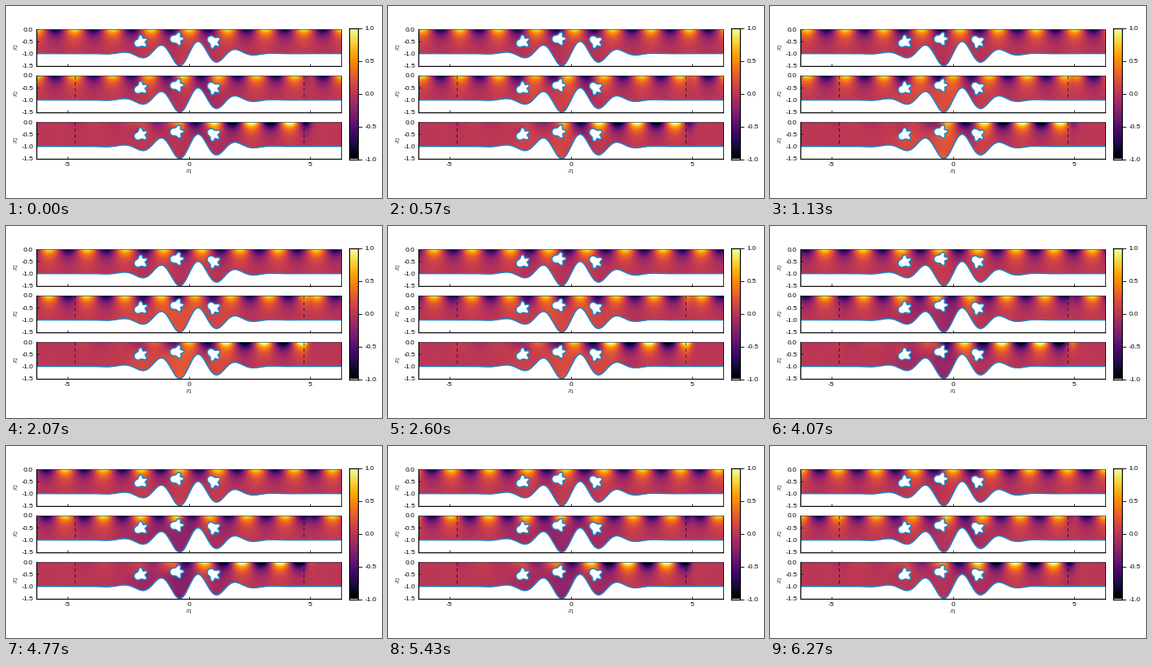
Recreate the animation shown at these times as a matplotlib script. Size 470 by 240 pixels, loop 6310 ms.

```python
import numpy as np
import matplotlib.pyplot as plt
from matplotlib.animation import FuncAnimation

W, H, DPI = 470, 240, 100
PX = 72 / DPI
FRAMES, LOOP = 189, 6310
K, NX, NY = 4, 760, 90
XMAX, PML = 2 * np.pi, 1.5 * np.pi
BLUE = "#2383bf"
BODIES = [(-1.98, -0.52, 207), (-0.49, -0.40, 183), (1.02, -0.51, 142)]

plt.rcParams.update({
    "font.family": "Liberation Sans",
    "font.size": 8.5 * PX,
    "axes.linewidth": 1.2 * PX,
    "axes.unicode_minus": False,
    "mathtext.fontset": "cm",
})


def bottom(x):
    return -1 + 0.52 * np.exp(-0.3 * x**2) * np.sin(4 * x)


def radius(a, turn):
    """One broad lobe pointing along `turn`, three slim ones opposite."""
    p = a - np.radians(turn)
    return 0.235 * (1 + 0.24 * np.cos(4 * p - 1.9 * np.sin(p)))


def body_outline(cx, cy, turn):
    a = np.linspace(0, 2 * np.pi, 161)
    r = radius(a, turn)
    return cx + r * np.cos(a), cy + r * np.sin(a)


def solve_waves():
    """Incident wave and the field scattered by bodies and sea bed."""
    dx, dy = 2 * XMAX / NX, 1.5 / NY
    x = -XMAX + (np.arange(NX) + 0.5) * dx
    y = -(np.arange(NY) + 0.5) * dy
    X, Y = np.meshgrid(x, y)

    fluid = Y > bottom(X)
    for cx, cy, turn in BODIES:
        u, v = X - cx, Y - cy
        fluid &= np.hypot(u, v) > radius(np.arctan2(v, u), turn)

    def stretch(p):
        return 1 + 10j * np.maximum(np.abs(p) - PML, 0) / (XMAX - PML)

    nu = K * np.tanh(K)
    top = nu / (dy * (1 - nu * dy / 2))

    def coefficients(s, s_face):
        cx = (fluid[:, :-1] & fluid[:, 1:]) / (s_face * dx**2)
        cy = (fluid[:-1] & fluid[1:]) * s / dy**2
        diag = np.zeros((NY, NX), complex)
        diag[:, :-1] -= cx
        diag[:, 1:] -= cx
        diag[:-1] -= cy
        diag[1:] -= cy
        diag[0] += top * s
        return cx, cy, diag

    inc = np.cosh(K * (Y + 1)) / np.cosh(K) * np.exp(1j * K * X)

    # the residual of the incident wave drives the scattered one
    cx, cy, diag = coefficients(np.ones(NX), np.ones(NX - 1))
    res = diag * inc
    res[:, :-1] += cx * inc[:, 1:]
    res[:, 1:] += cx * inc[:, :-1]
    res[:-1] += cy * inc[1:]
    res[1:] += cy * inc[:-1]
    rhs = np.where(fluid & (np.abs(X) < PML - dx), -res, 0)

    cx, cy, diag = coefficients(stretch(x), stretch(x[:-1] + dx / 2))
    diag = np.where(fluid, diag - 1e-6, 1)

    # block tridiagonal elimination, column by column
    inverses = []
    for j in range(NX):
        block = np.diag(diag[:, j]) + np.diag(cy[:, j], 1) + np.diag(cy[:, j], -1)
        if j:
            c = cx[:, j - 1]
            block -= c[:, None] * inverses[-1] * c
            rhs[:, j] -= c * (inverses[-1] @ rhs[:, j - 1])
        inverses.append(np.linalg.inv(block))
    sca = np.zeros((NY, NX), complex)
    sca[:, -1] = inverses[-1] @ rhs[:, -1]
    for j in range(NX - 2, -1, -1):
        sca[:, j] = inverses[j] @ (rhs[:, j] - cx[:, j] * sca[:, j + 1])
    return inc, sca


def add_axes(left, top, width, height):
    return fig.add_axes([left / W, 1 - (top + height) / H, width / W, height / H])


def draw_panel(top, dashed, labelled):
    ax = add_axes(38, top, 381.2, 45.7)
    im = ax.imshow(np.zeros((NY, NX)), cmap="inferno", vmin=-1, vmax=1,
                   extent=(-XMAX, XMAX, -1.5, 0), aspect="auto")
    x = np.linspace(-XMAX, XMAX, 800)
    ax.fill_between(x, bottom(x), -1.6, color="white", lw=0)
    ax.plot(x, bottom(x), color=BLUE, lw=1.6 * PX)
    for body in BODIES:
        ax.fill(*body_outline(*body), fc="white", ec=BLUE, lw=1.6 * PX)
    if dashed:
        for side in (-PML, PML):
            ax.plot([side, side], [0, -1], color="black", alpha=0.65,
                    lw=PX, dashes=(4, 3.5))
    ax.set(xlim=(-XMAX, XMAX), ylim=(-1.5, 0))
    ax.spines["top"].set(color="#2c3a50", linewidth=0.7 * PX)
    ax.spines["right"].set_linewidth(0.8 * PX)
    ax.set_xticks([-5, 0, 5], ["-5", "0", "5"] if labelled else [""] * 3)
    ax.set_yticks([0, -0.5, -1, -1.5], ["0.0", "-0.5", "-1.0", "-1.5"])
    ax.tick_params(direction="in", length=3 * PX, width=0.8 * PX, pad=4 * PX)
    fig.text(13 / W, 1 - (top + 22.5) / H, "$x_2$", rotation=90,
             ha="center", va="center")
    return im


def draw_colorbar():
    ax = add_axes(429, 27.5, 10.5, 164)
    ax.imshow(np.linspace(1, -1, 256)[:, None], cmap="inferno",
              extent=(0, 1, -1, 1), aspect="auto")
    ticks = [-1, -0.5, 0, 0.5, 1]
    ax.set_xticks([])
    ax.set_yticks(ticks, [f"{v:.1f}" for v in ticks])
    ax.yaxis.tick_right()
    ax.tick_params(length=5 * PX, width=0.9 * PX, pad=4 * PX)


fig = plt.figure(figsize=(W / DPI, H / DPI), dpi=DPI, facecolor="white")
incident, scattered = solve_waves()
fields = [incident, incident + scattered, scattered]
images = [draw_panel(29 + 58 * n, n > 0, n == 2) for n in range(3)]
draw_colorbar()
fig.text(228.5 / W, 1 - 207 / H, "$x_1$", ha="center", va="center")


def update(i):
    phase = np.exp(-1j * i / 30)
    for im, field in zip(images, fields):
        im.set_data((field * phase).real)
    return images


anim = FuncAnimation(fig, update, frames=FRAMES, interval=LOOP / FRAMES,
                     repeat=True, repeat_delay=0)
plt.show()
```
